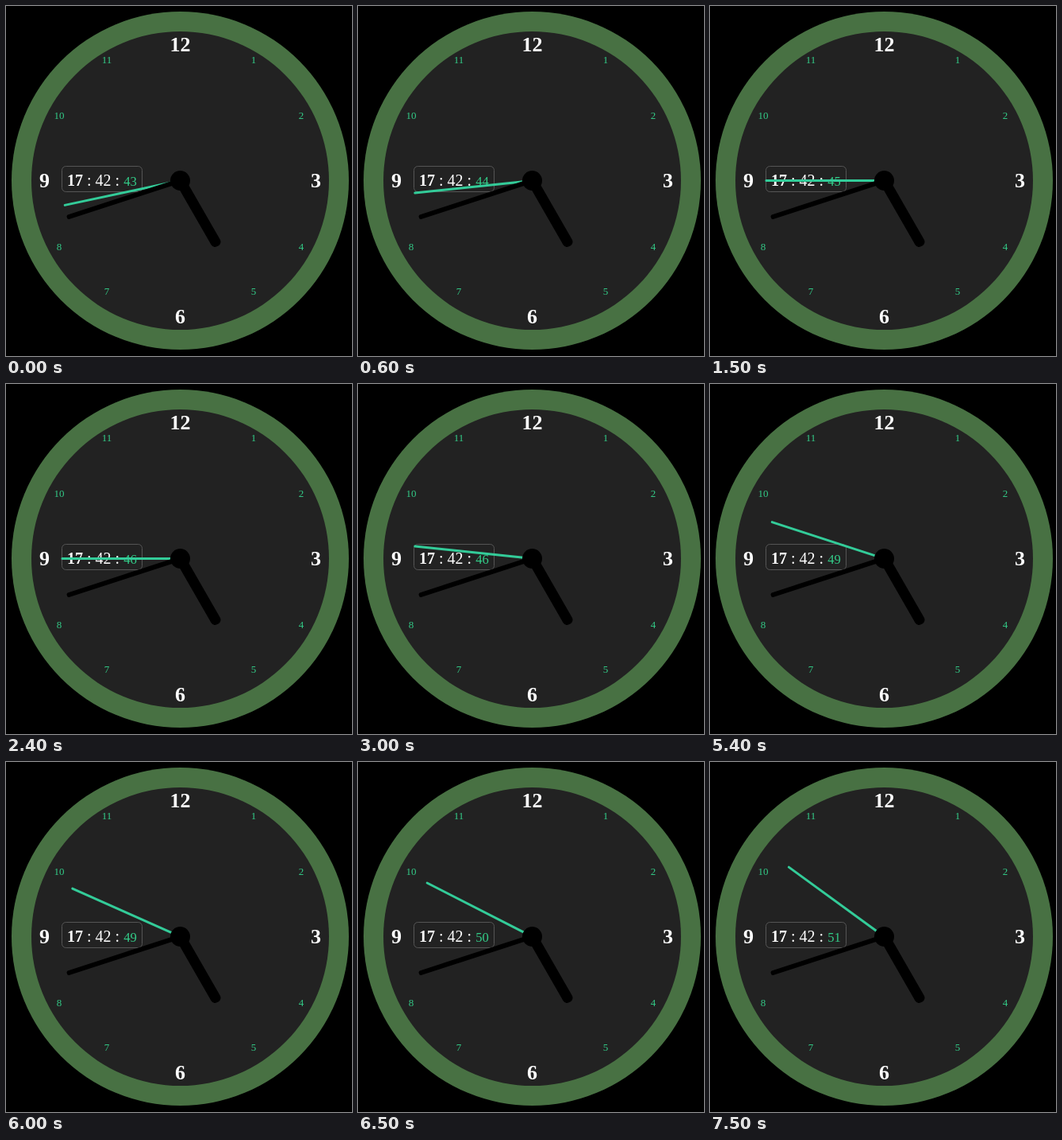
An HTML page that plays this animation: 436x440 px, repeating every 8000 ms.

```html
<!DOCTYPE html>
<html lang="en">
<head>
<meta charset="utf-8">
<title>Clock</title>
<style>
  html, body { margin: 0; width: 100%; height: 100%; overflow: hidden; background: #000; }
  svg { display: block; }
  text { font-family: "Liberation Serif", "Times New Roman", serif; fill: #fff; }
  .major { font-size: 26px; font-weight: bold; text-anchor: middle; }
  .minor { font-size: 13px; text-anchor: middle; fill: #3c8; }
  .digital { font-size: 20px; white-space: pre; }
  .digital .sec { font-size: 16.67px; fill: #3c8; }
</style>
</head>
<body>
<svg width="436" height="440" viewBox="0 0 436 440">
  <circle cx="219.5" cy="219.5" r="212.5" fill="#487143"/>
  <circle cx="219.5" cy="219.5" r="187.5" fill="#222"/>
  <g id="numerals"></g>
  <rect x="70.5" y="201.5" width="101" height="32" rx="5" fill="none" stroke="#555"/>
  <text class="digital" x="77" y="226"><tspan font-weight="bold">17</tspan> : 42 : <tspan class="sec" id="seconds">43</tspan></text>
  <g id="hands" transform="translate(219.5 219.5)"></g>
</svg>
<script>
const LOOP = 8000, STEP = 100, FIRST_SECOND = 43, FIRST_TICK = 400;
const SVG_NS = "http://www.w3.org/2000/svg";
const byId = id => document.getElementById(id);

function add(parent, tag, attributes, content = "") {
  const node = document.createElementNS(SVG_NS, tag);
  for (const key in attributes) node.setAttribute(key, attributes[key]);
  node.textContent = content;
  parent.append(node);
  return node;
}

function addNumerals() {
  const rows = [
    [57, 0, 12], [72, 92.5, 11, 1], [142, 152.5, 10, 2], [228, 171, 9, 3],
    [307, 152.5, 8, 4], [363, 92.5, 7, 5], [399, 0, 6]
  ];
  for (const [y, offset, ...hours] of rows) {
    hours.forEach((hour, i) => add(byId("numerals"), "text", {
      class: hour % 3 ? "minor" : "major",
      x: 219.5 + (i ? offset : -offset),
      y
    }, hour));
  }
}

function addHand(length, width, fill) {
  return add(byId("hands"), "rect", {
    x: -width / 2, y: -length, width, height: length, rx: width * 0.45, fill
  });
}

const rotate = (hand, degrees) => hand.setAttribute("transform", `rotate(${degrees})`);

addNumerals();
const secondHand = addHand(150, 3, "#3c9");
rotate(addHand(150, 6, "#000"), 252);
rotate(addHand(95, 13, "#000"), 150);
add(byId("hands"), "circle", { r: 12.5 });

function render(ms) {
  const time = Math.floor((ms % LOOP) / STEP) * STEP;
  const ticks = Math.floor((time - FIRST_TICK) / 1000) + 1;
  const second = FIRST_SECOND + ticks;
  // The digits change first, then the hand catches up; even seconds take longer.
  const sinceTick = time - FIRST_TICK - (ticks - 1) * 1000;
  const glide = second % 2 ? 100 : 200;
  const progress = ticks ? Math.min(1, sinceTick / glide) : 1;
  rotate(secondHand, 6 * (second - 1 + progress));
  byId("seconds").textContent = second;
}

const start = performance.now();
function frame() {
  render(performance.now() - start);
  requestAnimationFrame(frame);
}
render(0);
requestAnimationFrame(frame);
</script>
</body>
</html>
```
